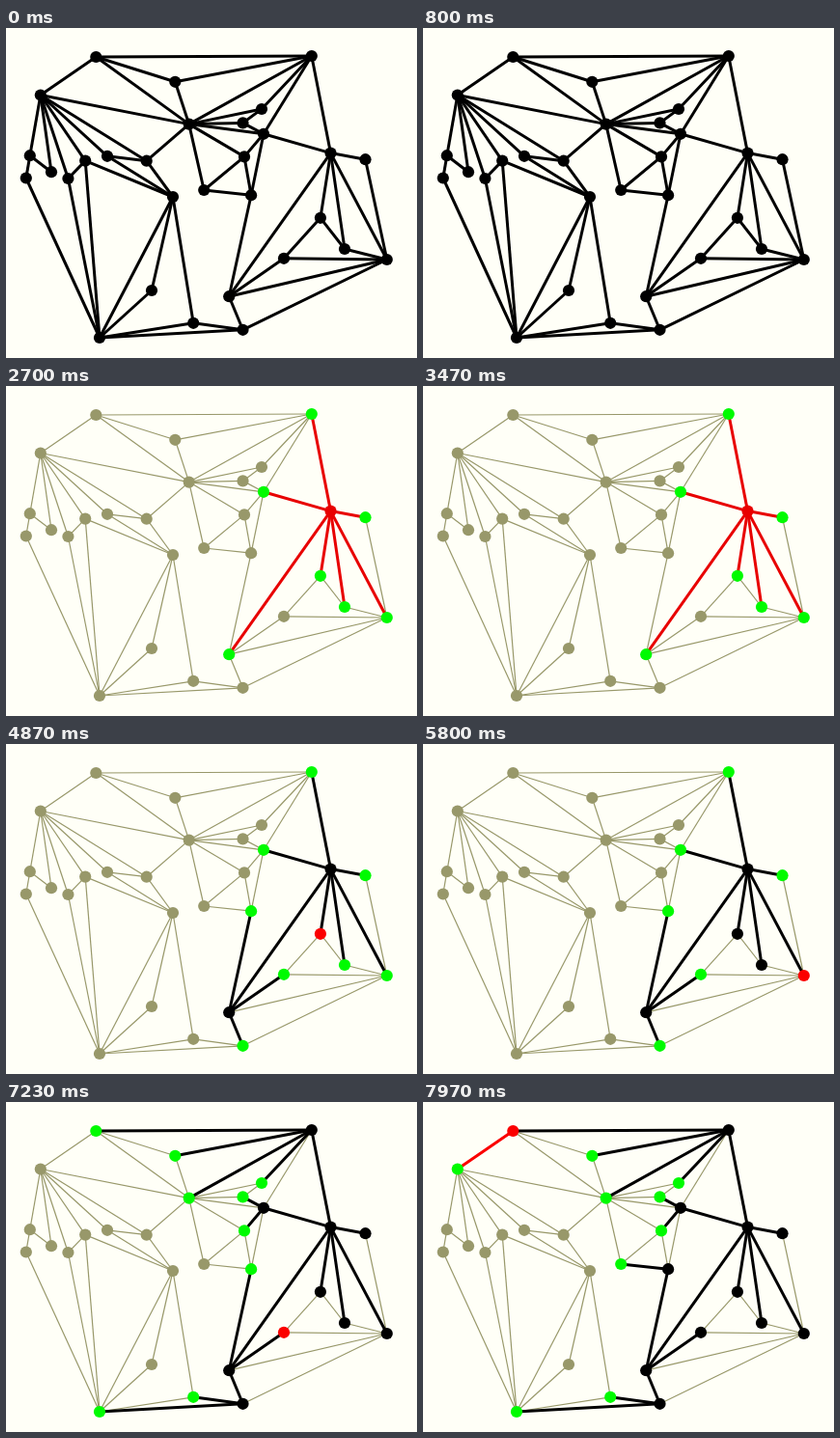
Write an HTML page with a canvas that moves like this. It is 426x342 px and loops after 8 s.

```html
<!DOCTYPE html>
<html lang="en">
<head>
<meta charset="utf-8">
<title>Breadth-first search</title>
<style>
  html, body { margin: 0; width: 100%; height: 100%; overflow: hidden; background: #fffff7; }
  canvas { display: block; }
</style>
</head>
<body>
<canvas id="stage" width="426" height="342"></canvas>
<script>
const ctx = document.getElementById('stage').getContext('2d');

const LOOP = 8000;
const SEARCH_START = 2700;   // root is visited
const WALK_START = 4498;     // the remaining nodes follow at a steady pace
const STEP = 1000 / 3;

const PAPER = '#fffff7', BLACK = '#000', IDLE = '#98986a';
const GREEN = '#00fb00', RED = '#fb0000', ROOT_RED = '#e80000';

const nodes = {
  A: [93.3, 30], B: [316.8, 29], C: [175.3, 55.8], D: [35.8, 69.5], E: [265, 84],
  F: [189.7, 99.6], G: [245.5, 98.4], H: [267, 109.8], I: [247, 133.4], J: [336.5, 129.6],
  K: [372.5, 136.2], L: [24.8, 132.2], M: [47, 149.2], N: [20.8, 155.5], O: [64.4, 156],
  P: [82.2, 137.6], Q: [105, 132.8], R: [145.7, 137.7], S: [173, 175], T: [205.2, 168],
  U: [254.1, 173.2], V: [325.9, 196.8], W: [351, 229], X: [394.8, 240], Y: [288, 238.8],
  Z: [231.2, 278.2], a: [245.5, 312.8], b: [194.2, 305.8], c: [97, 321], d: [151, 272]
};

const edges = ('AB AD AC AF CB CF BF BE BH BJ EF EG GF GH FH FD FR FT FI HI HU HJ IT IU TU UZ ' +
  'JZ JV JW JX JK KX VY VW WX YX YZ ZX Za Xa DL DM DO DP DQ DR LN LM Nc OP Oc Pc PS ' +
  'QR QS RS Sc Sd Sb dc bc ba ca').split(' ');

function angle(from, to) {
  const [x0, y0] = nodes[from], [x1, y1] = nodes[to];
  return Math.atan2(y0 - y1, x1 - x0);
}

function neighbours(n) {
  return edges.filter(e => e.includes(n))
    .map(e => e[0] === n ? e[1] : e[0])
    .sort((p, q) => angle(n, p) - angle(n, q));
}

// Visit order, each entry with the nodes it discovers.
function search(root) {
  const seen = new Set(root), order = [{ node: root, found: [] }];
  for (const visit of order) {
    for (const n of neighbours(visit.node)) {
      if (seen.has(n)) continue;
      seen.add(n);
      visit.found.push(n);
      order.push({ node: n, found: [] });
    }
  }
  return order;
}

const visits = search('J');

function line(p, q, color, width) {
  ctx.strokeStyle = color;
  ctx.lineWidth = width;
  ctx.beginPath();
  ctx.moveTo(...nodes[p]);
  ctx.lineTo(...nodes[q]);
  ctx.stroke();
}

function dot(n, color) {
  ctx.fillStyle = color;
  ctx.beginPath();
  ctx.arc(...nodes[n], 6.1, 0, Math.PI * 2);
  ctx.fill();
}

function stepAt(t) {
  if (t < SEARCH_START) return -1;
  if (t < WALK_START) return 0;
  return 1 + Math.floor((t - WALK_START) / STEP);
}

function draw(t) {
  const step = stepAt(t), idle = step < 0;
  const red = step === 0 ? ROOT_RED : RED;
  const colors = {};

  ctx.fillStyle = PAPER;
  ctx.fillRect(0, 0, 426, 342);
  for (const [p, q] of edges) line(p, q, idle ? BLACK : IDLE, idle ? 3 : 1.2);

  visits.slice(0, step + 1).forEach(({ node, found }, i) => {
    const color = i === step ? red : BLACK;
    colors[node] = color;
    for (const n of found) {
      colors[n] = GREEN;
      line(node, n, color, 3);
    }
  });

  for (const n in nodes) dot(n, idle ? BLACK : colors[n] || IDLE);
}

const start = performance.now();
function tick() {
  draw((performance.now() - start) % LOOP);
  requestAnimationFrame(tick);
}
tick();
</script>
</body>
</html>
```
